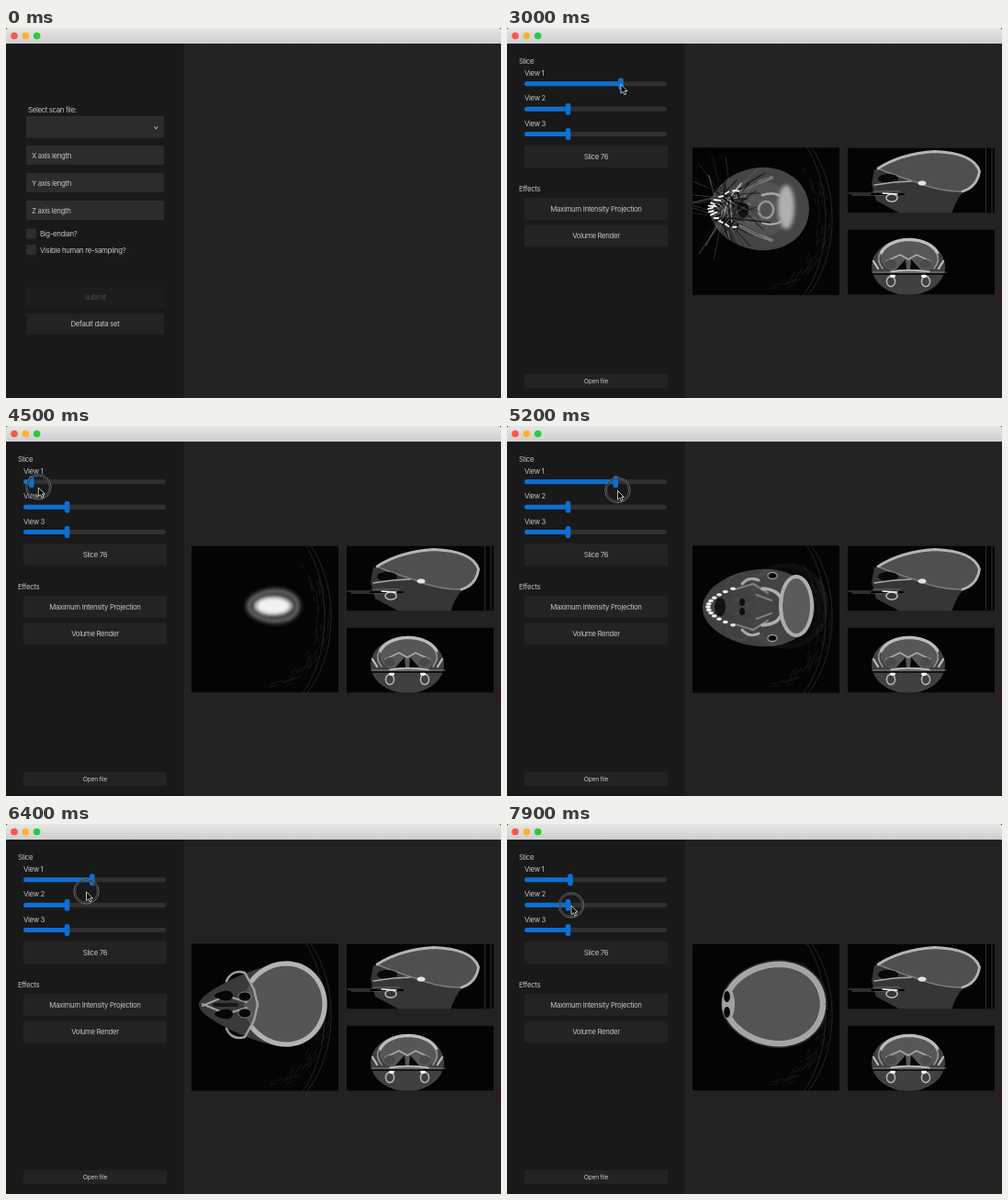
Recreate the animation shown at these times as an HTML page with a canvas. Size 539x403 px, loop 8 s.

```html
<!DOCTYPE html>
<html lang="en">
<head>
<meta charset="utf-8">
<title>Scan viewer</title>
<style>
  html, body { margin: 0; width: 100%; height: 100%; overflow: hidden; background: #000; }
  svg, canvas { position: absolute; left: 0; top: 0; }
  canvas { left: 202px; top: 130px; }
  text { font: 7.8px Inter, sans-serif; letter-spacing: -.043em; fill: #c2c2c2; }
</style>
</head>
<body>
<svg width="539" height="403" viewBox="0 0 539 403">
  <defs>
    <linearGradient id="bar" x2="0" y2="1">
      <stop stop-color="#e6e6e6"/><stop offset="1" stop-color="#cecece"/>
    </linearGradient>
  </defs>
  <rect y="10" width="539" height="393" fill="#222"/>
  <rect y="10" width="193.5" height="393" fill="#191919"/>
  <path d="M0 17V2Q0 0 2 0H537Q539 0 539 2V17Z" fill="url(#bar)"/>
  <circle cx="9" cy="8.5" r="3.8" fill="#fb5550"/>
  <circle cx="21.3" cy="8.5" r="3.8" fill="#fbb32b"/>
  <circle cx="33.6" cy="8.5" r="3.8" fill="#2ac940"/>
  <g id="form"></g>
  <g id="main"></g>
  <g id="pointer">
    <g id="ring" fill="none" stroke="#777" stroke-width=".9">
      <circle r="12.8" stroke="#111" stroke-width="2" stroke-opacity=".6"/>
      <circle r="13.7"/><circle r="12" stroke="#5c5c5c"/>
    </g>
    <path d="M0 .5V10.2L2.3 8.2 3.8 11.6 5.6 10.8 4.1 7.5H7Z" fill="#000" stroke="#eee" stroke-width=".8"/>
  </g>
</svg>
<canvas id="scan" width="330" height="161"></canvas>
<script>
const $ = id => document.getElementById(id);
const clamp = (x, a = 0, b = 1) => Math.min(b, Math.max(a, x));
const mix = (a, b, k) => a + (b - a) * k;
const gray = n => `rgb(${n},${n},${n})`;

// ---- interface ----
const box = (x, y, w, h, fill, r = 1.5) =>
  `<rect x="${x}" y="${y}" width="${w}" height="${h}" rx="${r}" fill="${fill}"/>`;
const label = (x, y, s, style = '') => `<text x="${x}" y="${y}" style="${style}">${s}</text>`;
const button = (x, y, w, h, s, fill = '#232323', style = '') =>
  box(x, y, w, h, fill) + label(97, y + h / 2 + 2.8, s, 'text-anchor:middle;' + style);
const slider = (n, x) => {
  const y = 33.4 + n * 27.4;
  return label(19, y - 9, 'View ' + n) + box(19, y - 2.5, 155, 5, '#303030', 2.5) +
    `<g id="s${n}">` + box(19, y - 2.5, x - 19, 5, '#0c6fd3', 2.5) +
    box(x - 2.8, y - 6.5, 5.6, 13, '#0c6fd3', 2.5) + '</g>';
};

$('form').innerHTML = label(24, 92, 'Select scan file:') + box(22, 96, 150, 23.5, '#2c2c2c') +
  '<path d="M161.5 107l1.8 3.2 1.8-3.2" fill="none" stroke="#c2c2c2" stroke-width=".9"/>' +
  ['X', 'Y', 'Z'].map((a, i) => box(22, 128 + 30 * i, 150, 21, '#2c2c2c') +
    label(28, 141.5 + 30 * i, a + ' axis length')).join('') +
  ['Big-endian?', 'Visible human re-sampling?'].map((s, i) =>
    box(22, 218.5 + 17.5 * i, 11, 11, '#2e2e2e') + label(37, 227 + 17.5 * i, s)).join('') +
  button(22, 282, 150, 22, 'Submit', '#1f1c1f', 'fill:#4c4a4c') +
  button(22, 311, 150, 22.5, 'Default data set');

$('main').innerHTML = label(13, 38.5, 'Slice') + slider(1, 124) + slider(2, 66.5) + slider(3, 66.5) +
  button(19, 128, 156, 24, 'Slice 76') + label(13, 178.3, 'Effects') +
  button(19, 185, 156, 24, 'Maximum Intensity Projection') +
  button(19, 214.5, 156, 23.5, 'Volume Render') +
  button(19, 377, 156, 15, 'Open file', '#232323', 'font-size:6.8px') +
  box(537.6, 288, 1.4, 16, '#4c0a1c', 0);
const [fill1, knob1] = $('s1').children;

// ---- scan drawing ----
let g;
// oval that narrows towards the left by taper; a to b limits it to an arc
function egg(x, y, rx, ry, taper = 0, a = 0, b = 2 * Math.PI) {
  const path = new Path2D();
  for (let i = 0; i <= 60; i++) {
    const t = mix(a, b, i / 60);
    path.lineTo(x + rx * Math.cos(t), y + ry * Math.sin(t) * (1 + taper * Math.cos(t)));
  }
  return path;
}
const fill = (path, color) => { g.fillStyle = color; g.fill(path); };
function line(path, color, w = 1) {
  g.strokeStyle = color;
  g.lineWidth = w;
  g.stroke(typeof path === 'string' ? new Path2D(path) : path);
}
// draws twice, the second time flipped about the line x or y = axis
function mirror(axis, flipX, draw) {
  draw();
  g.save();
  g.translate(flipX ? 2 * axis : 0, flipX ? 0 : 2 * axis);
  g.scale(flipX ? -1 : 1, flipX ? 1 : -1);
  draw();
  g.restore();
}
function random(seed) {
  return () => (seed = seed * 16807 % 2147483647) / 2147483647;
}
function pane(x, y, w, h) {
  g.beginPath();
  g.rect(x, y, w, h);
  g.clip();
  g.fillStyle = '#040404';
  g.fill();
}
function layer(draw) {
  const c = document.createElement('canvas');
  c.width = 330; c.height = 161;
  g = c.getContext('2d');
  g.translate(-202, -130);
  g.lineCap = g.lineJoin = 'round';
  g.filter = 'blur(.6px)';
  draw();
  return c;
}
// head rest with faint grain
const axial = draw => layer(() => {
  pane(202, 130.5, 160, 160);
  const r = random(9);
  for (let i = 0; i < 70; i++) {
    const a = mix(-.8, 1.4, r());
    line(egg(277, 208, 60 + r() * 17, 72 + r() * 10, 0, a, a + .1), '#131313', 1.2);
  }
  for (const d of [0, 7]) line(egg(277, 208, 77 - d, 110, 0, -.9, .9), '#262626');
  draw();
});

// skull cap, growing from the crown as v rises
function dome(v) {
  const s = Math.sqrt(clamp((v - 29) / 40)), size = clamp(1 + (v - 29) / 25, .6);
  const rx = mix(28, 53, s) * size, ry = mix(17, 43, s) * size;
  g.save();
  g.filter = `blur(${mix(1.8, .6, s)}px)`;
  const skull = egg(291, 196, rx, ry, .1);
  line(skull, '#242424', 10);
  fill(skull, gray(mix(62, 84, s)));
  line(skull, gray(mix(95, 165, s)), mix(4, 6.5, s));
  g.globalAlpha = clamp(1 - s * 2.2);
  fill(egg(291, 196, rx * .8, ry * .68), '#aaa');
  fill(egg(291, 196, rx * .65, ry * .5), '#f2f2f2');
  g.globalAlpha = clamp((v - 56) / 11);
  fill(egg(241, 196, 7, 17), '#a0a0a0');
  mirror(196.5, false, () => fill(egg(239.5, 188, 3.3, 6), '#050505'));
  g.restore();
}

// skull open at the front with a face narrowing to the nose
function face(nose, cx, rx, draw) {
  fill(egg((nose + 350) / 2, 197, (350 - nose) / 2, 41, .45), '#3a3a3a');
  fill(egg(cx, 196, rx, 43, .08), '#555');
  line(egg(cx, 196, rx, 44, .05, -2.5, 2.5), '#b4b4b4', 5.2);
  mirror(197, false, draw);
}
const brow = () => face(217, 300, 47, () => {
  line('M245 167Q253 159 264 162', '#c6c6c6', 3.5);
  line('M247 171Q258 180 265 189', '#888', 1.6);
  fill(egg(251, 179, 6, 8), '#494949');
  fill(egg(242, 197, 25, 7), '#606060');
  line('M219 194L240 191L264 190', '#a8a8a8', 1.8);
  fill(egg(234, 198, 7, 2), '#060606');
  fill(egg(255, 194, 6, 2), '#060606');
});
const orbit = () => face(210, 303, 44, () => {
  line('M240 171Q246 158 260 162L270 180L274 197', '#a0a0a0', 2.5);
  line('M214 198L240 187L262 194', '#a0a0a0', 2);
  fill(egg(237, 187, 10, 5, .4), '#050505');
  fill(egg(260, 188, 7, 5), '#050505');
  line(egg(260, 188, 7, 5), '#909090');
  line('M226 198H252', '#0a0a0a', 1.5);
});

function teeth(draw) {
  for (let i = -6; i <= 6; i++) draw(219 + .75 * i * i, 197 + i * 3.3, i);
}
function jaw() {
  fill(egg(274, 198, 61, 42, .1), '#424242');
  fill(egg(232, 197, 6, 10), '#111');
  fill(egg(315, 196, 17, 32), '#5c5c5c');
  line(egg(315, 196, 17, 32), '#b4b4b4', 4);
  mirror(197, false, () => {
    fill(egg(256, 192, 3, 4), '#0c0c0c');
    line('M248 178L268 172L284 182M272 184L288 190', '#808080', 2.2);
    line('M256 172Q264 163 274 168', '#b0b0b0', 3);
    line('M278 177Q296 178 299 190', '#b4b4b4', 3.5);
    fill(egg(289, 163, 5, 3.5), '#040404');
    line(egg(289, 163, 5, 3.5), '#a0a0a0', 1.3);
  });
  teeth((x, y) => fill(egg(x, y, 2.9, 1.7), '#f4f4f4'));
}
function metal() {
  fill(egg(275, 197, 54, 45, .08), '#454545');
  fill(egg(280, 197, 28, 30), '#525252');
  fill(egg(257, 198, 6, 9), '#141414');
  g.filter = 'blur(2px)';
  fill(egg(304, 195, 9, 24), '#b0b0b0');
  g.filter = 'blur(.7px)';
  line(egg(282, 198, 8, 9), '#999', 2.5);
  mirror(197, false, () => {
    line('M254 178L272 169L288 163', '#7c7c7c', 3.5);
    line('M278 182Q290 178 298 183', '#a8a8a8', 2.5);
  });
  // streaks spread from both rows of fillings
  const r = random(41);
  for (let i = 0; i < 130; i++) {
    const a = r() * 6.283, n = 12 + r() * 42;
    const x = 238 + (r() - .5) * 14, y = (i % 2 ? 185 : 209) + (r() - .5) * 9;
    g.globalAlpha = .25 + r() * .45;
    line(`M${x} ${y}l${Math.cos(a) * n} ${Math.sin(a) * n}`,
      i % 3 ? '#050505' : n > 26 ? '#666' : '#eee', .4 + r() * 1.2);
  }
  g.globalAlpha = 1;
  teeth((x, y, i) => {
    line(`M${x} ${y}l${3 + r() * 5} ${(r() - .5) * 7}`, '#fff', 1.8);
    line(`M${x + 5} ${y + 2}l${r() * 6} ${-i}`, '#000', 1.3);
  });
}

function sagittal() {
  pane(371, 130.5, 160, 71);
  fill(new Path2D('M400 154L397 170L402 188L430 203H484Q488 188 498 177L440 155Z'), '#363636');
  const brain = new Path2D('M404 153Q428 137 466 135Q508 136 514 156Q512 174 494 178Q470 178 446 168Q420 160 404 153');
  fill(brain, '#4f4f4f');
  line(brain, '#7c7c7c', 1.5);
  line('M404 153Q428 137 466 134.5Q508 136 514.5 156Q512 173 496 178', '#b4b4b4', 2.8);
  fill(egg(415, 164, 11, 5), '#080808');
  line('M400 171L421 168L440 167', '#aaa', 1.4);
  fill(egg(452, 169, 4.5, 2.6), '#e4e4e4');
  line('M372 180H400M376 182H414M398 178H428', '#808080', .7);
  line('M397 181H432', '#000', 1.8);
  line(egg(419, 185, 6, 4), '#bbb', 1.5);
  line('M409 180L425 181', '#f5f5f5', 1.3);
  line('M521.5 131V201M528 131V201', '#303030');
}
function coronal() {
  pane(371, 219.5, 160, 71);
  fill(egg(437, 260, 40, 31), '#404040');
  fill(egg(438, 250, 31, 19), '#575757');
  line(egg(438, 251, 32, 20.5, 0, -2.85, -.3), '#bcbcbc', 3.4);
  mirror(437, true, () => {
    line('M406 246Q402 253 409 262', '#909090', 1.8);
    line('M413 254L428 247L437 252', '#aaa', 1.5);
    fill(egg(418, 257, 6, 5), '#4a4a4a');
    fill(new Path2D('M434 252L424 263H435Z'), '#060606');
    line('M399 254L404 262', '#bbb', 2.3);
    line(egg(418, 276, 4.5, 5.5), '#bbb', 1.5);
    fill(egg(420, 270, 3, 2), '#fff');
  });
  line('M394 268H482', '#030303', 1.6);
  line('M398 266H478', '#a0a0a0', .7);
  line('M418 265.5Q438 262 460 265.5', '#ccc', 1.3);
}

const empty = axial(() => {}), still = [sagittal, coronal].map(layer);
const slices = [[87, axial(brow)], [94, axial(orbit)], [120, axial(jaw)], [124, axial(metal)]];
const view = $('scan').getContext('2d');

function drawScan(v) {
  view.clearRect(0, 0, 330, 161);
  view.drawImage(empty, 0, 0);
  g = view;
  g.save();
  g.translate(-202, -130);
  if (v < 87) dome(Math.min(v, 69));
  g.restore();
  let from = 69;
  for (const [at, image] of slices) {
    view.globalAlpha = clamp((v - from) / (at - from));
    view.drawImage(image, 0, 0);
    from = at;
  }
  view.globalAlpha = 1;
  for (const image of still) view.drawImage(image, 0, 0);
}

// ---- motion: time, x, y, eased from key to key ----
const path = [[100, 228, 384], [900, 136.5, 325.5], [2150, 136.5, 325.5], [3000, 124, 61], [3100, 124, 61],
  [3400, 112, 62], [4300, 23, 66], [5200, 120.5, 70], [5750, 126, 72], [6800, 69, 74],
  [7200, 67, 73], [7700, 67, 90], [7900, 70, 88.5]];

function pointerAt(t) {
  const i = clamp(path.findIndex(p => p[0] > t), 1, path.length - 1);
  const a = path[i - 1], b = path[t >= 7900 ? path.length - 1 : i];
  if (t >= 7900) return b.slice(1);
  const k = clamp((t - a[0]) / (b[0] - a[0])), s = k * k * (3 - 2 * k);
  return [mix(a[1], b[1], s), mix(a[2], b[2], s)];
}

function frame(now) {
  const t = Math.floor(now % 8000 / 100) * 100;
  const open = t >= 1400, [x, y] = pointerAt(t);
  // the knob trails the pointer a little while dragged
  const v = t < 3100 ? 124 : Math.max(22, pointerAt(Math.min(t - 80, 6800))[0]);
  const show = (id, on) => $(id).style.display = on ? '' : 'none';
  show('form', !open);
  show('main', open);
  show('scan', open);
  show('pointer', t >= 100);
  show('ring', t >= 1000 && !open || t >= 3100 && t < 7300 || t >= 7900);
  $('pointer').setAttribute('transform', `translate(${x} ${y})`);
  fill1.setAttribute('width', v - 19);
  knob1.setAttribute('x', v - 2.8);
  if (open) drawScan(v);
}

const start = performance.now();
function tick() {
  frame(performance.now() - start);
  requestAnimationFrame(tick);
}
tick();
</script>
</body>
</html>
```
